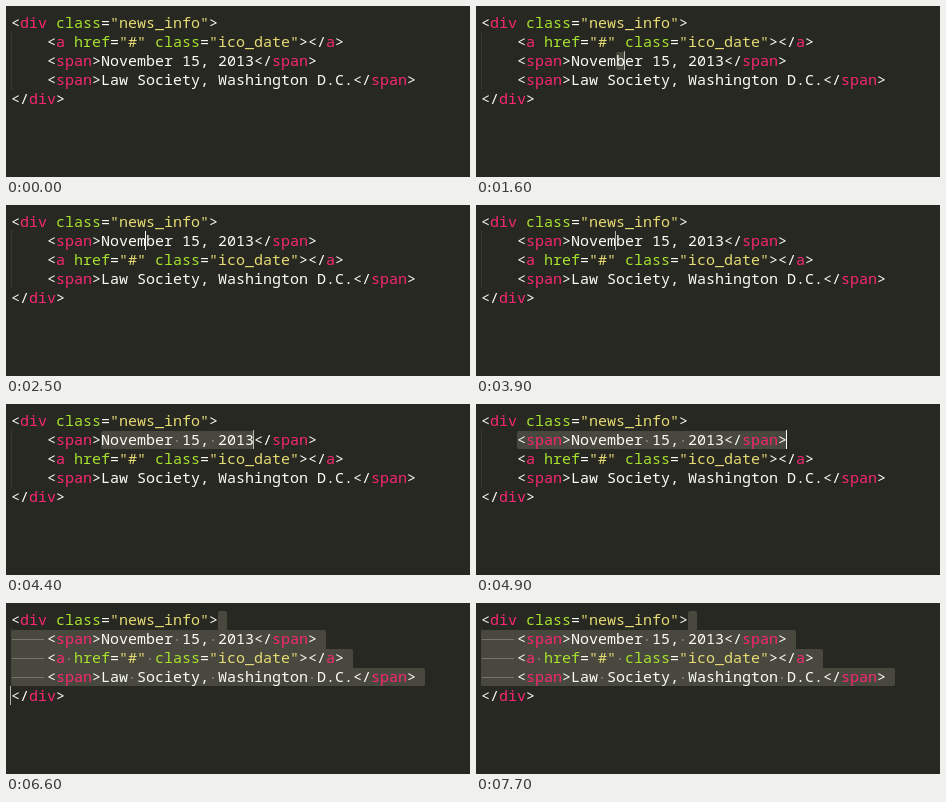
These frames come from a looping animation (464x171 px, 8 s). An HTML page with a canvas:

```html
<!DOCTYPE html>
<html lang="en">
<head>
<meta charset="utf-8">
<title>Tag selection in a code editor</title>
<style>
  html, body { margin: 0; width: 100%; height: 100%; overflow: hidden; background: #272822; }
  canvas { display: block; }
</style>
</head>
<body>
<canvas id="stage" width="464" height="171"></canvas>
<script>
const canvas = document.getElementById('stage');
const ctx = canvas.getContext('2d');
const LOOP = 8000, LEFT = 4, TOP = 7, CHAR = 9, LINE = 19, INDENT = 4;
const COLOR = {
  bg: '#272822', text: '#fcfcf8', tag: '#f92672', attr: '#a6e22e',
  string: '#e6db74', selection: '#49483e', blank: '#77756a', guide: '#46473f'
};

const open = '<div class="news_info">';
const link = '    <a href="#" class="ico_date"></a>';
const date = '    <span>November 15, 2013</span>';
const place = '    <span>Law Society, Washington D.C.</span>';
const before = [open, link, date, place, '</div>'];
const after = [open, date, link, place, '</div>'];

// A range runs between two [row, column] points; the caret sits at its end.
function pick(lines, row, text) {
  const col = lines[row].indexOf(text);
  return { lines, from: [row, col], to: [row, col + text.length] };
}
const mid = date.indexOf('b');

// "key" is the key press that restarts the caret blink.
const scenes = [
  { at: 0, lines: before },
  { at: 500, key: 600, ...pick(before, 2, 'b') },
  { at: 1700, key: 1700, ...pick(after, 1, 'b') },
  { at: 2500, key: 2500, lines: after, from: [1, mid], to: [1, mid] },
  { at: 4000, key: 4000, ...pick(after, 1, 'November 15, 2013') },
  { at: 4900, key: 4900, ...pick(after, 1, date.trim()) },
  { at: 5300, key: 5200, lines: after, from: [0, open.length], to: [4, 0] }
];

const colX = col => LEFT + col * CHAR;
const rowY = row => TOP + row * LINE;

// Split a range into one span per row, counting each line break as a column.
function spansOf({ lines, from, to }) {
  const spans = [];
  if (!from) return spans;
  for (let row = from[0]; row <= to[0]; row++) {
    const start = row === from[0] ? from[1] : 0;
    const end = row === to[0] ? to[1] : lines[row].length + 1;
    if (end > start) spans.push({ row, start, end });
  }
  return spans;
}

// On for 400 ms, off for 500 ms, with a short fade at each edge.
function caretAlpha(age) {
  const phase = age % 1000;
  if (phase >= 500) return 0;
  return phase >= 400 || (age >= 1000 && phase < 100) ? .65 : 1;
}

function tokenColor(token, prev, next) {
  if (token[0] === '"') return COLOR.string;
  if (/<\/?$/.test(prev) && /\w/.test(token)) return COLOR.tag;
  if (next === '=') return COLOR.attr;
  return COLOR.text;
}

function drawLine(line, row) {
  for (const m of line.matchAll(/"[^"]*"|\w+|[^\w"\s]+/g)) {
    const end = m.index + m[0].length;
    ctx.fillStyle = tokenColor(m[0], line.slice(0, m.index), line[end]);
    ctx.fillText(m[0], colX(m.index) + 1, rowY(row) + 15);
  }
}

function drawGuide() {
  ctx.fillStyle = COLOR.guide;
  for (let y = rowY(1); y < rowY(4); y += 2) ctx.fillRect(LEFT + 1, y, 1, 1);
}

function drawSelection(spans) {
  ctx.fillStyle = COLOR.selection;
  spans.forEach(({ row, start, end }, i) => {
    const prev = spans[i - 1], next = spans[i + 1];
    const height = next ? LINE : LINE - 1;
    const radii = [
      !prev || prev.start > start, !prev || prev.end < end,
      !next || next.end < end, !next || next.start > start
    ].map(outer => outer ? 2 : 0);
    ctx.beginPath();
    ctx.roundRect(colX(start) + 1, rowY(row) + 1, (end - start) * CHAR, height, radii);
    ctx.fill();
  });
}

// Selected tabs show as a dash, selected spaces as dots.
function drawBlanks(spans, lines) {
  ctx.fillStyle = COLOR.blank;
  for (const { row, start, end } of spans) {
    const y = rowY(row) + 10;
    if (start === 0) ctx.fillRect(LEFT + 2, y, INDENT * CHAR - 4, 1);
    for (let c = Math.max(start, INDENT); c < end; c++) {
      if (lines[row][c] === ' ') ctx.fillRect(colX(c) + 4, y, 2, 2);
    }
  }
}

function drawCaret([row, col], age) {
  ctx.globalAlpha = caretAlpha(age);
  ctx.fillStyle = COLOR.text;
  ctx.fillRect(colX(col), rowY(row), 1, LINE);
  ctx.globalAlpha = 1;
}

function draw(t) {
  const scene = scenes.findLast(s => s.at <= t);
  const spans = spansOf(scene);
  ctx.fillStyle = COLOR.bg;
  ctx.fillRect(0, 0, canvas.width, canvas.height);
  drawGuide();
  drawSelection(spans);
  drawBlanks(spans, scene.lines);
  ctx.font = '500 15px "Noto Sans Mono", monospace';
  scene.lines.forEach(drawLine);
  if (scene.to) drawCaret(scene.to, t - scene.key);
}

const start = performance.now();
function tick() {
  draw(Math.max(0, performance.now() - start) % LOOP);
  requestAnimationFrame(tick);
}
tick();
</script>
</body>
</html>
```
